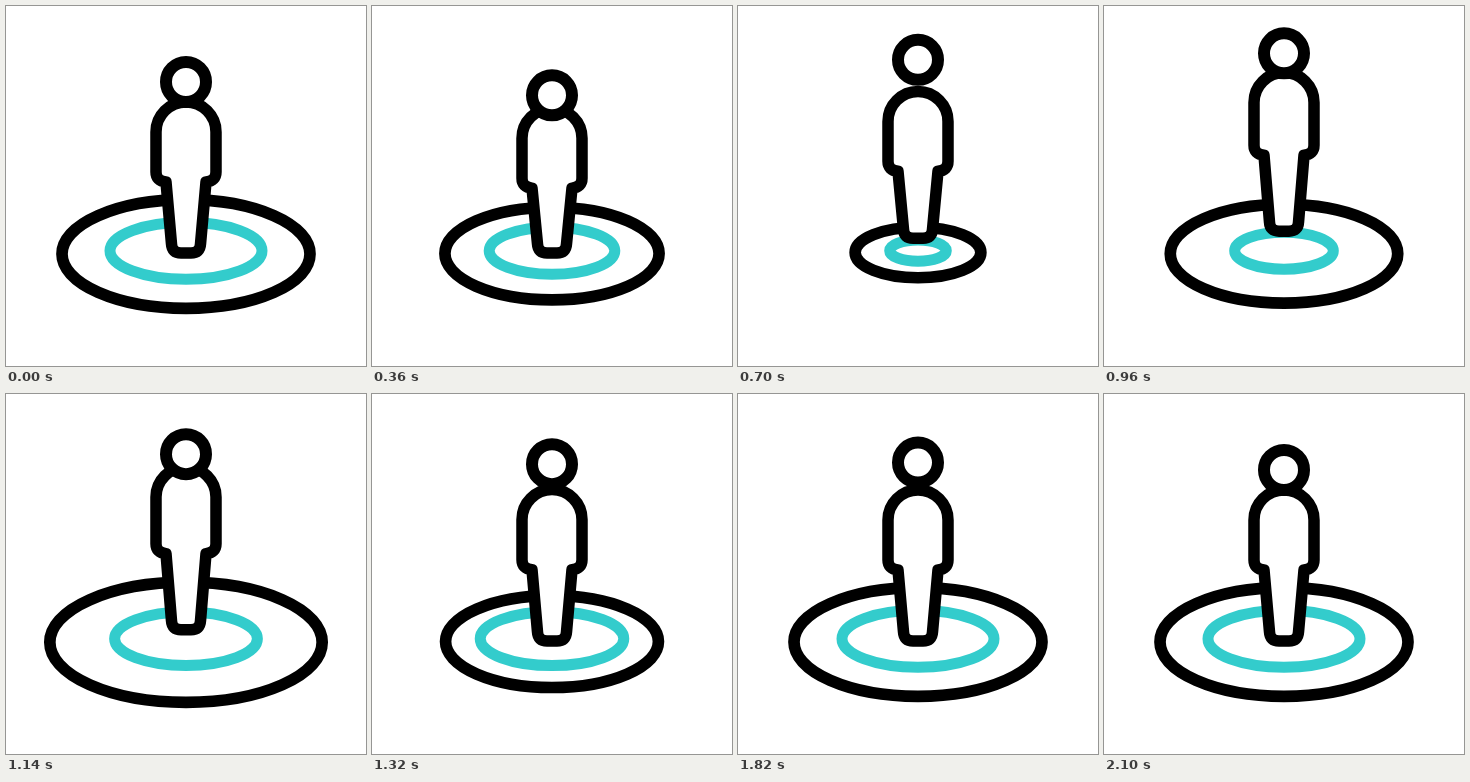
An HTML page that plays this animation: 360 by 360 pixels, repeating every 3000 ms.

```html
<!DOCTYPE html>
<html lang="en">
<head>
<meta charset="utf-8">
<title>Jumping figure</title>
<style>
  html, body { margin: 0; width: 100%; height: 100%; overflow: hidden; background: #fff; }
  svg { display: block; width: 100vw; height: 100vh; }
</style>
</head>
<body>
<svg viewBox="0 0 360 360" stroke="#000" fill="#fff" stroke-linejoin="round">
  <ellipse id="outer" cx="180" stroke-width="11.7"/>
  <ellipse id="inner" cx="180" stroke="#33cccc" stroke-width="11"/>
  <path id="body" stroke-width="11.5"/>
  <circle id="head" cx="180" r="20" stroke-width="12"/>
</svg>
<script>
const LOOP = 3000;
const STEP = 20;
const [outer, inner, body, head] =
  ["outer", "inner", "body", "head"].map(id => document.getElementById(id));

// Eased 0 to 1 between two times.
function ease(t, from, to) {
  const u = Math.min(1, Math.max(0, (t - from) / (to - from)));
  return u * u * (3 - 2 * u);
}

// Eased swing from 0 up to 1 at the peak and back to 0.
const swing = (t, start, peak, end) => ease(t, start, peak) - ease(t, peak, end);

// Crouch, leap, then a small bounce after landing.
const headY = t => 76
  + 15 * swing(t, 100, 430, 820)
  - 33 * swing(t, 430, 820, 1440)
  - 9 * swing(t, 1100, 1720, 2100);

const torsoShift = (t, apex, height) =>
  6.5 * swing(t, 100, 400, apex) - height * swing(t, 400, apex, 1340);

// Feet follow a ballistic arc while off the ground.
function feetShift(t) {
  const u = (t - 560) / 680;
  return u > 0 && u < 1 ? -90 * u * (1 - u) : 0;
}

// Rings shrink on take-off, spread to a peak, then rebound to rest.
function ringScale(t, peak, shrink, overshoot) {
  const rest = 1700;
  const dip = (peak + rest) / 2;
  return 1
    - shrink * swing(t, 170, 720, peak)
    + overshoot * swing(t, 720, peak, dip)
    - 0.2 * swing(t, peak, dip, rest);
}

function setEllipse(ellipse, cy, rx, ry) {
  ellipse.setAttribute("cy", cy);
  ellipse.setAttribute("rx", rx);
  ellipse.setAttribute("ry", ry);
}

function bodyPath(shoulderShift, handShift, feet) {
  const shoulder = 126 + shoulderShift;
  const hand = 166 + handShift, hip = 176 + handShift;
  const ankle = 238 + feet, sole = 247 + feet;
  return `M160 ${hip} Q150 ${hip - 1} 150 ${hand} V${shoulder}
    A30 30 0 0 1 210 ${shoulder} V${hand} Q210 ${hip - 1} 200 ${hip}
    L194.5 ${ankle} Q194 ${sole} 185 ${sole} H175 Q166 ${sole} 165.5 ${ankle} Z`;
}

function draw(t) {
  const outerRx = 124 * ringScale(t, 1105, 0.495, 0.11);
  const innerRx = 76 * ringScale(t, 1240, 0.63, 0);
  setEllipse(outer, 245 + outerRx * 0.024, outerRx, outerRx * 0.475 - 4.6);
  setEllipse(inner, 244.7, innerRx, innerRx * 0.375);
  body.setAttribute("d",
    bodyPath(torsoShift(t, 1040, 31), torsoShift(t, 990, 27), feetShift(t)));
  head.setAttribute("cy", headY(t));
}

const start = performance.now();
function tick() {
  const t = (performance.now() - start) % LOOP;
  draw(Math.floor(t / STEP) * STEP);
  requestAnimationFrame(tick);
}
tick();
</script>
</body>
</html>
```
